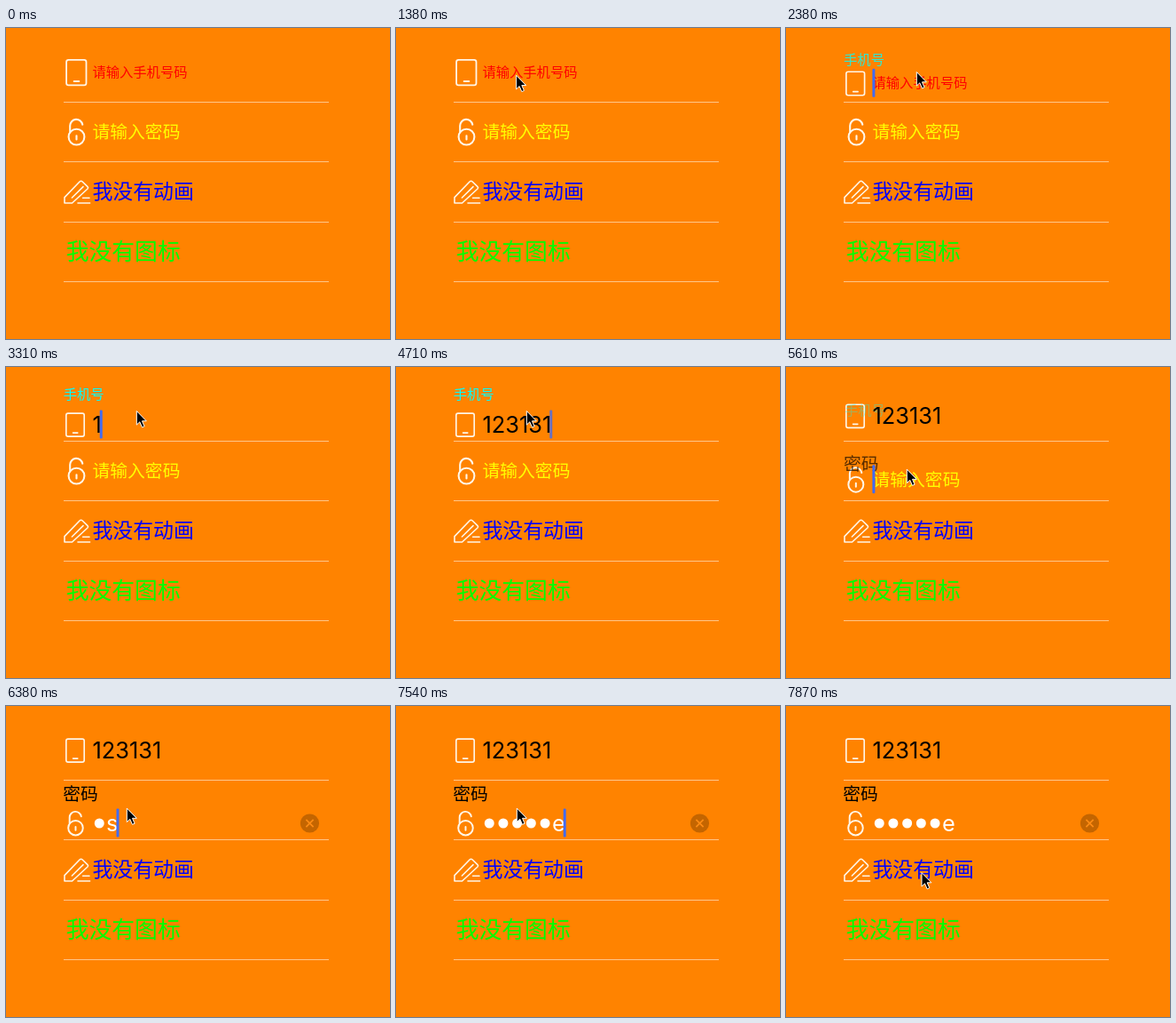
Recreate the animation shown at these times as an HTML page. Size 433x350 px, loop 8 s.

```html
<!DOCTYPE html>
<html lang="zh">
<head>
<meta charset="utf-8">
<title>Animated text fields</title>
<style>
  html, body { margin: 0; width: 100%; height: 100%; overflow: hidden; background: #ff8300; }
  svg { display: block; width: 433px; height: 350px; }
  text { font-family: "Noto Sans CJK SC", "Noto Sans CJK", sans-serif; white-space: pre; }
  .typed { font: 25.4px Inter, "Liberation Sans", sans-serif; }
  .icon { fill: none; stroke: #fff6e8; stroke-width: 1.8; stroke-linecap: round; stroke-linejoin: round; }
  .s { font-size: 15.3px; }
  .m { font-size: 19.8px; }
  .l { font-size: 22.9px; }
  .xl { font-size: 25.8px; }
</style>
</head>
<body>
<svg viewBox="0 0 433 350">
  <path d="M65 83.5H364M65 150.5H364M65 218.5H364M65 285.5H364" stroke="#ffc68a"/>

  <!-- field contents are drawn around y = 0 and moved as a whole -->
  <g id="phoneIcon" class="icon">
    <rect x="3.1" y="-14.2" width="22.4" height="28.6" rx="2.4"/>
    <path d="M11.6 10H17.4"/>
  </g>
  <g id="lockIcon" class="icon" style="stroke-width: 2.1">
    <circle cx="14.5" cy="5.6" r="8.9"/>
    <path d="M7.2 0V-7A7.1 7.1 0 0 1 21.3 -8.2M14.5 4.2V8.4"/>
  </g>
  <path class="icon" style="stroke-width: 1.6"
    d="M66 197V190.6L83 173Q84.6 171.4 86.2 173L92 178.6Q93.2 179.8 92 181L74.6 197ZM74.4 191L87 178.6M86.6 191.3H94M81 197H94.6"/>

  <text id="phoneLabel" class="s" fill="#0ff">手机号</text>
  <text id="passLabel" class="m" fill="#000">密码</text>

  <g id="phoneRow">
    <text id="phoneHint" class="s" x="97.4" y="5">请输入手机号码</text>
    <text id="phoneText" class="typed" x="97.4" y="9" fill="#000"></text>
  </g>
  <g id="passRow">
    <text id="passHint" class="m" x="97.5" y="7.1">请输入密码</text>
    <g id="dots" fill="#fff"></g>
    <text id="passText" class="typed" y="9" fill="#fff"></text>
  </g>

  <text class="l" x="97.4" y="192.2" fill="#00f">我没有动画</text>
  <text class="xl" x="67.7" y="261.2" fill="#0f0">我没有图标</text>

  <g id="clear">
    <circle cx="342.5" cy="132" r="10.6" fill="#c46500"/>
    <path d="M338.4 127.9L346.6 136.1M346.6 127.9L338.4 136.1" stroke="#ff8c14" stroke-width="1.7"/>
  </g>
  <rect id="caret" width="3" height="32" rx="1" fill="#426bf2"/>
  <path id="mouse" d="M0 0V15.6L3.5 12.3L6.2 18.4L8.8 17.2L6.2 11.3H11Z" fill="#000" stroke="#fff" stroke-linejoin="round"/>
</svg>

<script>
const LOOP = 8000, LEFT = 97.4, DOT = 15.7;
const ui = {};
document.querySelectorAll('[id]').forEach(n => ui[n.id] = n);
ui.phoneHint.setAttribute('fill', '#f00');
ui.passHint.setAttribute('fill', '#ff0');

const phone = { focus: 2160, chars: '123131', keys: [3300, 3400, 3670, 3870, 4020, 4140] };
const pass = { focus: 5430, chars: 'aswqre', keys: [6170, 6380, 6590, 6800, 6920, 7030] };

const moves = [
  { at: 1060, ms: 380, x: 146, y: 52 },
  { at: 1450, ms: 120, x: 140, y: 50 },
  { at: 1760, ms: 100, x: 147.3, y: 49.5 },
  { at: 4860, ms: 440, x: 136.3, y: 115 },
  { at: 7570, ms: 300, x: 153, y: 187.5 }
];

for (let i = 0; i < pass.chars.length - 1; i++) {
  const c = document.createElementNS('http://www.w3.org/2000/svg', 'circle');
  c.setAttribute('cx', LEFT + DOT * (i + 0.5));
  c.setAttribute('r', 5.5);
  ui.dots.append(c);
}

const clamp = k => Math.min(1, Math.max(0, k));
function ease(t, start, ms = 300) {
  const k = clamp((t - start) / ms);
  return k * k * (3 - 2 * k);
}

const count = (field, t) => field.keys.filter(k => k <= t).length;
const show = (node, alpha) => node.setAttribute('opacity', +alpha);
const move = (node, x, y, s = 1) =>
  node.setAttribute('transform', `translate(${x} ${y}) scale(${s})`);

function floatLabel(node, x, y, p) {
  move(node, x + 2 * (1 - p), y + 28 * (1 - p));
  show(node, p);
}

// Solid after focus or a key press, then fading out and in.
function blink(idle) {
  if (idle < 540) return 1;
  const s = (idle - 540) % 1000;
  return s < 440 ? 1 - clamp(s / 150) : clamp((s - 440) / 150);
}

function mouseAt(t) {
  let x = -14, y = 71;
  for (const m of moves) {
    const k = ease(t, m.at, m.ms);
    x += (m.x - x) * k;
    y += (m.y - y) * k;
  }
  return [x, y];
}

function render(t) {
  const inPhone = ease(t, phone.focus), inPass = ease(t, pass.focus);
  const up = inPhone - inPass;
  const phoneY = 50 + 15 * up, passY = 117 + 15 * inPass;

  move(ui.phoneIcon, 65, phoneY, 1 - 0.09 * inPhone);
  move(ui.lockIcon, 65, passY, 1 - 0.07 * inPass);
  move(ui.phoneRow, 0, phoneY);
  move(ui.passRow, 0, passY);
  floatLabel(ui.phoneLabel, 64.7, 36, up);
  floatLabel(ui.passLabel, 64.3, 105.9, inPass);

  const n = count(phone, t), m = count(pass, t);
  ui.phoneText.textContent = phone.chars.slice(0, n);
  show(ui.phoneHint, !n);

  const lastX = LEFT + DOT * Math.max(0, m - 1);
  ui.passText.textContent = pass.chars.slice(Math.max(0, m - 1), m);
  ui.passText.setAttribute('x', lastX);
  [...ui.dots.children].forEach((c, i) => show(c, i < m - 1));
  show(ui.passHint, !m);
  show(ui.clear, m > 0);

  const onPass = t >= pass.focus;
  const field = onPass ? pass : phone;
  const typed = onPass ? m : n;
  const text = onPass ? ui.passText : ui.phoneText;
  const end = (onPass ? lastX : LEFT) + text.getComputedTextLength() - 2;
  const lastKey = typed ? field.keys[typed - 1] : field.focus;
  ui.caret.setAttribute('x', typed ? end : LEFT);
  ui.caret.setAttribute('y', (onPass ? passY : phoneY) - 16.6);
  show(ui.caret, t < phone.focus ? 0 : blink(t - lastKey));

  move(ui.mouse, ...mouseAt(t));
}

const begin = performance.now();
function tick() {
  render((performance.now() - begin) % LOOP);
  requestAnimationFrame(tick);
}
tick();
</script>
</body>
</html>
```
